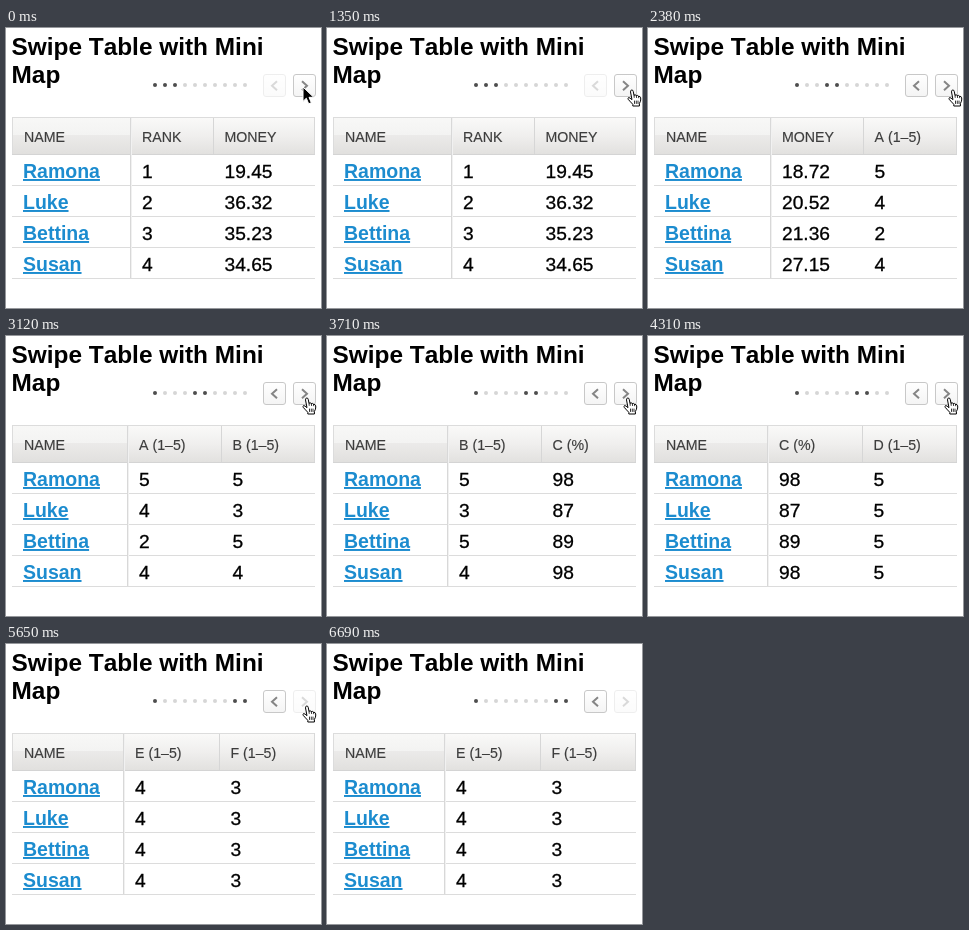
Recreate the animation shown at these times as an HTML page. Size 315 px wide and 280 px high, loop 7050 ms.

```html
<!DOCTYPE html>
<html lang="en">
<head>
<meta charset="utf-8">
<title>Swipe Table with Mini Map</title>
<style>
  html, body { margin: 0; width: 100%; height: 100%; overflow: hidden; background: #fff; }
  svg { display: block; font-family: "Liberation Sans", Arial, sans-serif; font-kerning: none; }
  .title { font-size: 24.4px; font-weight: bold; }
  .head { font-size: 14.2px; fill: #3c3c3c; stroke: #3c3c3c; stroke-width: .15; }
  .cell { font-size: 19.2px; stroke: #000; stroke-width: .3; }
  .link { font-size: 19.5px; font-weight: bold; fill: #1c8ccf; text-decoration: underline; }
</style>
</head>
<body>
<svg width="315" height="280" viewBox="0 0 315 280">
  <defs>
    <linearGradient id="bar" x2="0" y2="1">
      <stop stop-color="#fafaf9"/><stop offset=".5" stop-color="#f0efee"/><stop offset="1" stop-color="#e2e1df"/>
    </linearGradient>
    <linearGradient id="gloss" x2="0" y2="1">
      <stop stop-color="#f8f8f7"/><stop offset=".49" stop-color="#f3f3f2"/>
      <stop offset=".5" stop-color="#ebeae9"/><stop offset="1" stop-color="#e1e0de"/>
    </linearGradient>
    <linearGradient id="up" x2="0" y2="1">
      <stop stop-color="#fff"/><stop offset="1" stop-color="#f4f4f4"/>
    </linearGradient>
    <linearGradient id="down" x2="0" y2="1">
      <stop stop-color="#dedede"/><stop offset=".75" stop-color="#f2f2f2"/><stop offset="1" stop-color="#f4f4f4"/>
    </linearGradient>
    <g id="arrow">
      <path d="M1 1V15.4L4.3 12.2 6.7 17.8 9.3 16.7 7 11.3H11.7Z" fill="#000" stroke="#fff" stroke-linejoin="round"/>
    </g>
    <g id="hand" fill="#fff" stroke="#000" stroke-linecap="round" stroke-linejoin="round">
      <path d="M3.5 2.5Q3.5 1 4.8 1 6 1 6.2 2.3L7 6.2Q8.6 5.4 9.3 6.6 10.8 5.9 11.5 7.3 13.3 7 13.7 8.8V11Q13.4 13 12.4 14.3V17H5.8V15.3Q3.5 13 1.2 10.3 .5 9 1.6 8.6 2.8 8.4 4.7 10.4Z"/>
      <path d="M7 6.2L7.2 8.4M9.3 6.6L9.6 8.6M11.5 7.3L11.7 8.8M7.5 12V14.5M9.3 12V14.5M11 12V14.5" stroke-width=".8"/>
    </g>
  </defs>
  <text class="title" x="5.5" y="27">Swipe Table with Mini</text>
  <text class="title" x="5.5" y="55">Map</text>
  <g id="view"></g>
</svg>
<script>
const LOOP = 7050;
const PRESSES = [1500, 2240, 2970, 3560, 4160, 4910, 5510];
const SHIFTS = [1640, 2380, 3120, 3710, 4310, 5060, 5650];
const SPLITS = [207, 216, 215, 215, 214, 214, 213, 213];
const NAMES = ["Ramona", "Luke", "Bettina", "Susan"];
const COLUMNS = [
  ["RANK", 1, 2, 3, 4],
  ["MONEY", "19.45", "36.32", "35.23", "34.65"],
  ["MONEY", "18.72", "20.52", "21.36", "27.15"],
  ["A (1–5)", 5, 4, 2, 4],
  ["B (1–5)", 5, 3, 5, 4],
  ["C (%)", 98, 87, 89, 98],
  ["D (1–5)", 5, 5, 5, 5],
  ["E (1–5)", 4, 4, 4, 4],
  ["F (1–5)", 3, 3, 3, 3]
];
// Pointer steps: start time, shape, left, top
const POINTER = [
  [0, "arrow", 296, 58], [1350, "hand", 300, 61], [2680, "hand", 297, 61],
  [2830, "hand", 296, 61], [5800, "hand", 297, 60], [5940, "arrow", 278, 125],
  [6090, "arrow", 262, 241], [6240, "arrow", 266, 255], [6390, "arrow", 273, 266],
  [6540, "arrow", 273, 276], [6690]
];
const view = document.getElementById("view");

const rect = (x, y, w, h, fill) => `<rect x="${x}" y="${y}" width="${w}" height="${h}" fill="${fill}"/>`;
const text = (kind, x, y, s) => `<text class="${kind}" x="${x}" y="${y}">${s}</text>`;
const column = (x, [title, ...cells], kind = "cell", inset = 0) =>
  text("head", x + inset, 114, title) + cells.map((s, i) => text(kind, x, 150 + 31 * i, s)).join("");
const passed = (times, t) => times.filter(at => at <= t).length;

function button(x, dir, enabled, pressed) {
  const mid = x + 11.5, d = 2.5 * dir;
  return `<g opacity="${enabled ? 1 : .3}">
    <rect x="${x + .5}" y="46.5" width="22" height="22" rx="2.5" fill="url(#${pressed ? "down" : "up"})" stroke="#c8c8c8"/>
    <path d="M${mid - d} 53.2L${mid + d} 57.7 ${mid - d} 62.2" fill="none" stroke="#858585" stroke-width="2"/></g>`;
}

function table(step) {
  const edge = 124 - step, split = SPLITS[step];
  let out = rect(6, 89, 303, 37, "url(#bar)") + rect(6, 89, edge - 6, 37, "url(#gloss)")
    + rect(6, 89, 303, 1, "#dcdcdc") + rect(6, 89, 1, 37, "#dcdcdc")
    + rect(308, 89, 1, 37, "#d8d8d8") + rect(split, 90, 1, 36, "#d6d6d6");
  for (let i = 0; i < 5; i++) out += rect(6, 126 + 31 * i, 303, 1, i ? "#dcdcdc" : "#d4d4d4");
  out += rect(edge, 90, 1, 160, "#d8d8d8") + rect(edge + 1, 90, 1, 160, "#f1f1f1");
  return out + column(17, ["NAME", ...NAMES], "link", 1)
    + column(edge + 12, COLUMNS[step]) + column(split + 11.5, COLUMNS[step + 1]);
}

function dots(step) {
  let out = "";
  for (let i = 0; i < 10; i++) {
    const shown = !i || i === step + 1 || i === step + 2;
    out += `<circle cx="${149 + 10 * i}" cy="57" r="2" fill="${shown ? "#4d4d4d" : "#d6d6d6"}"/>`;
  }
  return out;
}

let last;
function draw(now) {
  const t = now % LOOP;
  const step = passed(SHIFTS, t);
  const pressed = passed(PRESSES, t) > step;
  const pose = passed(POINTER.map(p => p[0]), t) - 1;
  const key = [step, pressed, pose].join();
  if (key !== last) {
    last = key;
    const [, shape, x, y] = POINTER[pose];
    view.innerHTML = dots(step) + button(257, -1, step > 0) + button(287, 1, step < 7, pressed)
      + table(step) + (shape ? `<use href="#${shape}" x="${x}" y="${y}"/>` : "");
  }
}

const start = performance.now();
function tick() {
  draw(performance.now() - start);
  requestAnimationFrame(tick);
}
tick();
</script>
</body>
</html>
```
